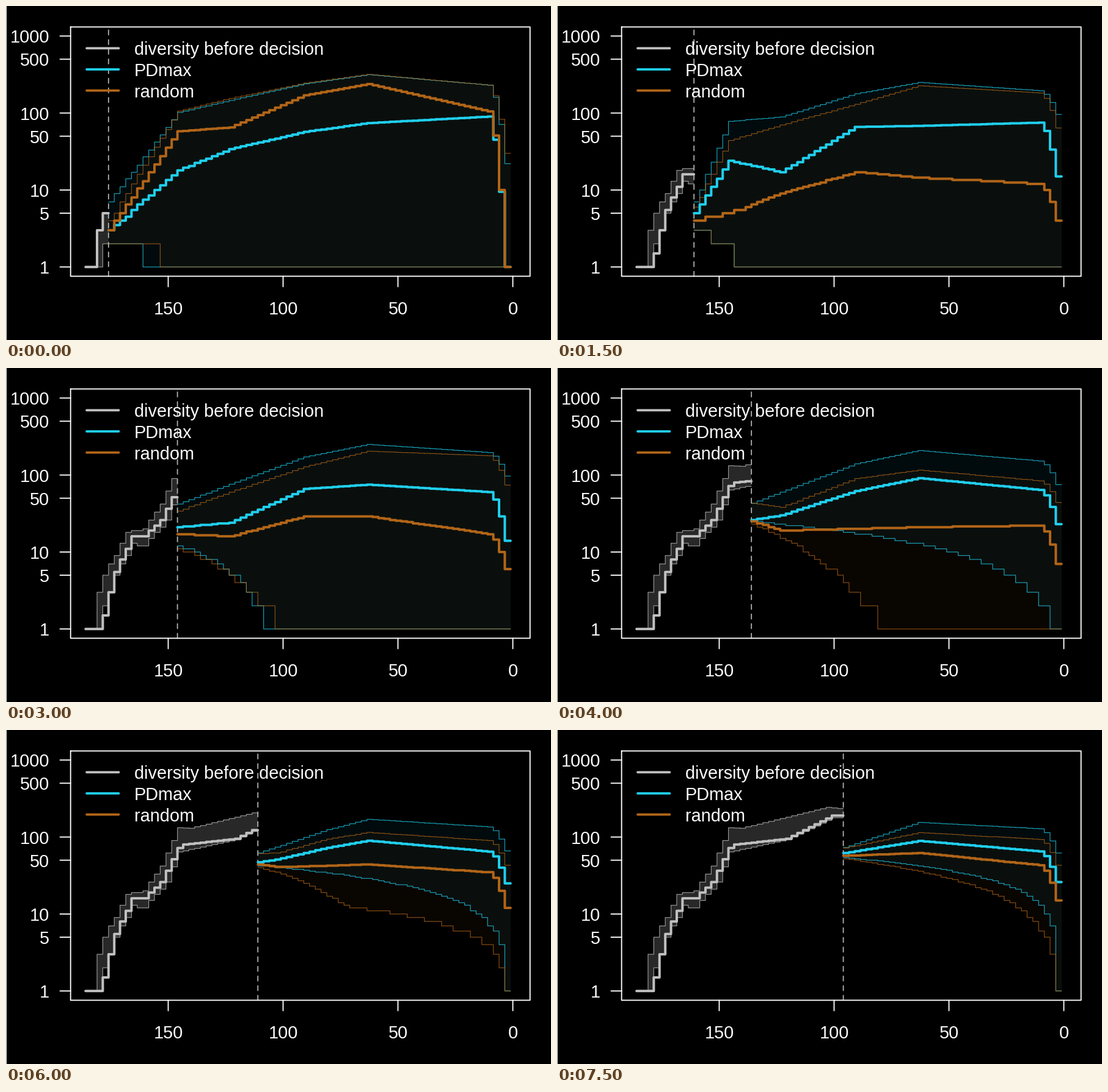
A matplotlib script that plays this animation: 892x548 px, repeating every 8 s.

```python
import numpy as np
import matplotlib.pyplot as plt
from matplotlib.animation import FuncAnimation

W, H, DPI = 892, 548, 64
PX = 72 / DPI                      # points per pixel
FRAMES, INTERVAL = 16, 500
LAST, PEAK = 74, 49                # number of time bins, bin of highest diversity
LEFT, RIGHT, TOP, BOTTOM = 105.7, 857.7, 34.4, 443.4

GREY, CYAN, ORANGE, WHITE = "#c0c0c0", "#20cfee", "#b26518", "#fafafa"


def y_of(v):
    return 428.2 - 126.3 * np.log10(v)


def x_of(i):
    return 130.2 + 9.4 * np.asarray(i, float)


def start_of(frame):
    """Time bin of the decision."""
    return 4 + 2 * frame + 2 * (frame >= 12)


def trend(*values):
    """Log curve through a start value and the last of the shared knots."""
    knots = (16, 25, 38, PEAK, 70, 73)[1 - len(values):]

    def curve(i, start):
        fall = np.clip((i - 70) / 3, 0, 1)
        i = np.where(i > 70, 70 + 3 * fall ** 1.7, i)
        return np.interp(i, (start, *knots), np.log(values))
    return curve


def decay(value, end, bend):
    """Log curve that falls from a start value to one at the end bin."""
    def curve(i, start):
        left = 1 - np.clip((i - start) / (end - start), 0, 1)
        return np.log(1 + (value - 1) * left ** bend)
    return curve


# upper bound, median and lower bound at key moments
poses = {
    "pd": {
        0: (trend(7, 102, 146, 240, 315, 230, 22),
            trend(3, 18, 34, 57, 74, 90, 1), decay(2, 10, 0.3)),
        3: (trend(7, 78, 89, 178, 250, 195, 96),
            trend(5, 24, 17, 66, 68, 75, 15), decay(3, 17, 0.6)),
        6: (trend(42, 76, 172, 250, 196, 97),
            trend(21, 24, 66, 75, 60, 14), decay(12, 31, 1)),
        8: (trend(43, 60, 140, 208, 152, 75),
            trend(26, 30, 62, 91, 64, 23), decay(25, 72, 0.9)),
        15: (trend(73, 155, 128, 62), trend(62, 89, 65, 26), decay(54, 73, 0.6)),
    },
    "random": {
        0: (trend(4, 106, 155, 245, 318, 230, 30),
            trend(3, 58, 65, 170, 238, 105, 1), decay(2, 13, 0.3)),
        3: (trend(6, 44, 70, 130, 226, 182, 64),
            trend(4, 5, 9, 17, 14.5, 12, 4), decay(3, 17, 0.6)),
        6: (trend(34, 60, 128, 204, 178, 74),
            trend(17, 16, 29, 29, 17, 6), decay(11, 34, 1.3)),
        8: (trend(43, 38, 90, 116, 84, 44),
            trend(25, 19, 20, 21, 22, 7), decay(23, 44, 1.8)),
        15: (trend(72, 114, 93, 43), trend(57, 62, 43, 15), decay(52, 73, 0.9)),
    },
}

# the same three curves before the decision, as {bin: value}
past = (
    {1: 1, 2: 3, 3: 5, 7: 18, 10: 20, 13: 42, 16: 132, 18: 130, 33: 243, 35: 235},
    {2: 1, 4: 3, 5: 5.5, 8: 16, 10: 16, 13: 26, 16: 72, 17: 80, 26: 95, 34: 190},
    {2: 1, 5: 5, 8: 13, 10: 12, 14: 26, 16: 64, 26: 92, 34: 178},
)


def history(frame):
    i = np.arange(start_of(frame))
    high, mid, low = (np.exp(np.interp(i, list(c), np.log(list(c.values())))) for c in past)
    return (high, mid, low) if frame else (high, high, low)


def future(group, frame):
    s = start_of(frame)
    i = np.arange(s, LAST)
    a = max(k for k in group if k <= frame)
    b = min(k for k in group if k >= frame)
    sa, sb = start_of(a), start_of(b)
    u = (s - sa) / (sb - sa) if b > a else 0
    mix = u * u * (3 - 2 * u)

    def stretched(curve, start):
        return curve(np.interp(i, (s, PEAK, LAST), (start, PEAK, LAST)), start)

    return [np.exp((1 - mix) * stretched(p, sa) + mix * stretched(q, sb))
            for p, q in zip(group[a], group[b])]


def steps(first, values, unit):
    v = np.maximum(1, np.round(values / unit) * unit)
    edges = x_of(np.arange(first, first + len(v) + 1))
    return np.repeat(edges, 2)[1:-1], np.repeat(y_of(v), 2)


fig = plt.figure(figsize=(W / DPI, H / DPI), dpi=DPI, facecolor="black")
ax = fig.add_axes([0, 0, 1, 1])
ax.set(xlim=(0, W), ylim=(H, 0))
ax.axis("off")


def stroke(x, y, color, width, z, **kw):
    return ax.plot(x, y, color=color, lw=width * PX, zorder=z, snap=False,
                   solid_capstyle="round", solid_joinstyle="round", **kw)[0]


def label(x, baseline, text, align):
    ax.text(x, baseline, text, color=WHITE, family="Liberation Sans",
            size=28.9 * PX, ha=align, va="baseline", zorder=8)


class Series:
    """Band with thin borders and a thick middle line."""

    def __init__(self, color, fill, alpha, z):
        self.band, = ax.fill([0, 0], [0, 0], color=fill, alpha=alpha, lw=0, zorder=1)
        self.high, self.low = (stroke([], [], color, 1.2, 2 + z, alpha=0.75) for _ in "hl")
        self.mid = stroke([], [], color, 4, 4 + z)

    def show(self, first, curves):
        (x, high), mid, (_, low) = map(steps, [first] * 3, curves, (1, 0.5, 1))
        self.high.set_data(x, high)
        self.low.set_data(x, low)
        self.mid.set_data(*mid)
        self.band.set_xy(np.column_stack([np.r_[x, x[::-1]], np.r_[high, low[::-1]]]))


before = Series(GREY, "#282828", 1, 0)
after = {"pd": Series(CYAN, CYAN, 0.055, 0.1),
         "random": Series(ORANGE, ORANGE, 0.055, 0.2)}
decision = stroke([], [], "#b0b0b0", 1.8, 3, dash_capstyle="round")
decision.set_dashes([4.4, 4.4])

# axes
stroke([0.5, 0.5], [0, H], WHITE, 1, 7)
stroke([LEFT, RIGHT, RIGHT, LEFT, LEFT], [TOP, TOP, BOTTOM, BOTTOM, TOP], WHITE, 1.9, 7)
for v in (1, 5, 10, 50, 100, 500, 1000):
    stroke([88.5, LEFT], [y_of(v)] * 2, WHITE, 1.9, 7)
    label(71, y_of(v) + 11, str(v), "right")
for t in (0, 50, 100, 150):
    x = 829.5 - 3.76 * t
    stroke([x, x], [BOTTOM, 460.5], WHITE, 1.9, 7)
    label(x, 506.5, str(t), "center")

# legend
for n, (text, color) in enumerate([("diversity before decision", GREY),
                                   ("PDmax", CYAN), ("random", ORANGE)]):
    stroke([132, 184.5], [69.3 + 34.7 * n] * 2, color, 3.8, 7)
    label(209.5, 80.5 + 34.7 * n, text, "left")


def update(frame):
    s = start_of(frame)
    before.show(0, history(frame))
    for name, series in after.items():
        series.show(s, future(poses[name], frame))
    decision.set_data([x_of(s)] * 2, [BOTTOM, TOP])


anim = FuncAnimation(fig, update, frames=FRAMES, interval=INTERVAL,
                     init_func=lambda: update(0), repeat=True, repeat_delay=0)
plt.show()
```
